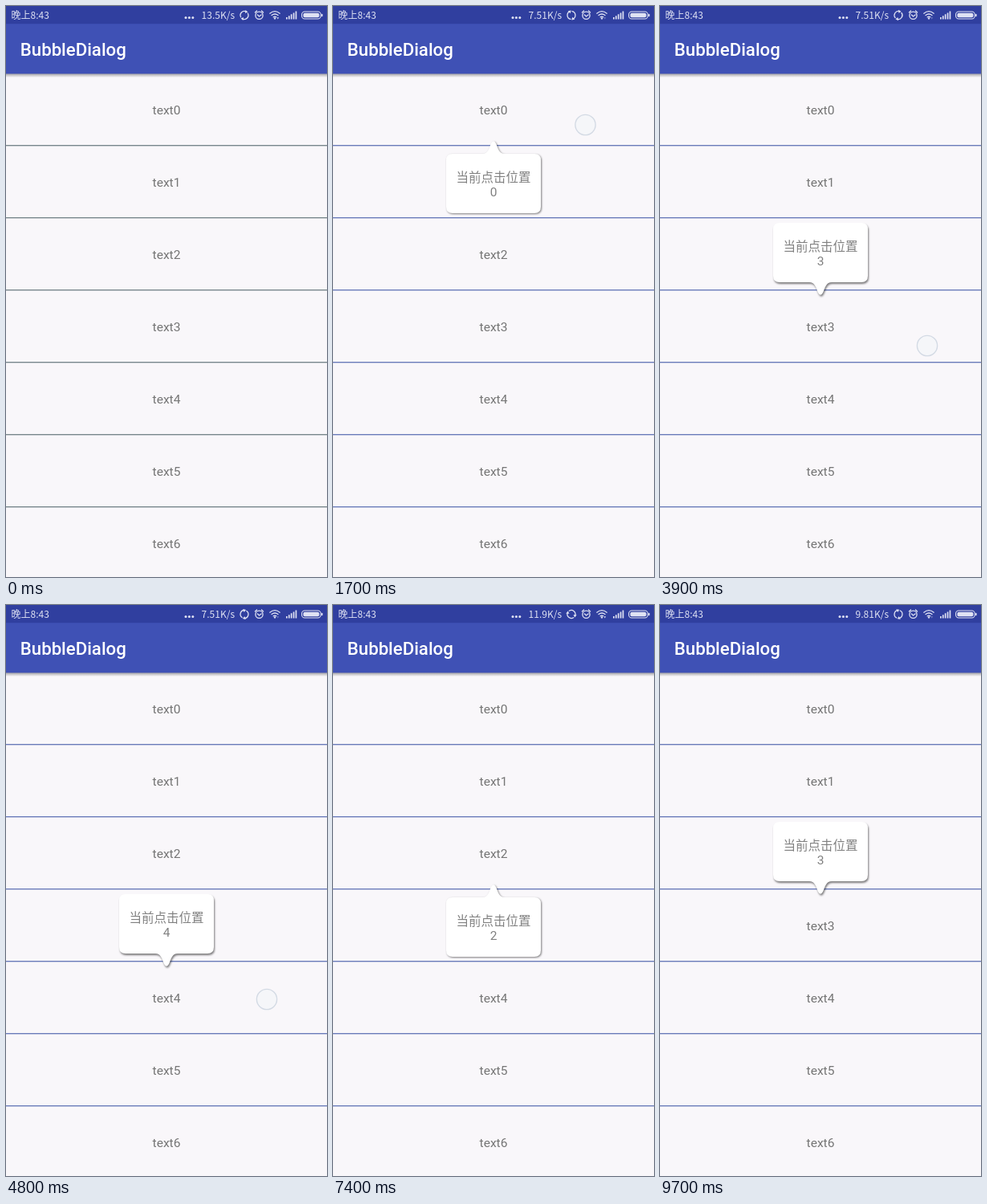
Write an HTML page that moves like this. It is 400 by 711 pixels and loops after 9.9 s.

```html
<!DOCTYPE html>
<html lang="zh">
<head>
<meta charset="utf-8">
<title>BubbleDialog</title>
<style>
  html, body { margin: 0; width: 100%; height: 100%; overflow: hidden; background: #f9f7fa; }
  svg { display: block; width: 100%; height: 100%; }
  text { font-family: Roboto, "Noto Sans CJK SC", "Noto Sans CJK", sans-serif; }
  .status { font: 12px "Noto Sans CJK SC", "Noto Sans CJK", "Noto Sans", sans-serif; fill: #dfe2f3; }
  .title { font-size: 22.2px; font-weight: 500; fill: #fff; }
  .row { font-size: 15.55px; fill: #757575; text-anchor: middle; }
  .bubble text { font-size: 15.5px; fill: #808080; text-anchor: middle; }
  .bubble path { fill: #fff; filter: drop-shadow(1.3px 1.3px 1.2px rgba(0, 0, 0, .5)); }
  .touch { fill: #f4f5f9; fill-opacity: .8; stroke: #d3dae4; stroke-width: 1.4; }
  .icon { fill: none; stroke: #dfe2f3; stroke-width: 1.3; stroke-linecap: round; }
  .solid { fill: #dfe2f3; }
</style>
</head>
<body>
<svg viewBox="0 0 400 711" preserveAspectRatio="none">
  <defs>
    <linearGradient id="shade" x1="0" y1="0" x2="0" y2="1">
      <stop offset="0" stop-color="#000" stop-opacity=".36"/>
      <stop offset="1" stop-color="#000" stop-opacity="0"/>
    </linearGradient>
  </defs>
  <rect width="400" height="711" fill="#f9f7fa"/>
  <g id="list"></g>
  <rect y="84" width="400" height="5" fill="url(#shade)"/>
  <rect width="400" height="84.4" fill="#3f51b5"/>
  <rect width="400" height="22.2" fill="#303f9f"/>
  <text class="title" x="17.8" y="62">BubbleDialog</text>

  <text class="status" x="6.5" y="16">晚上8:43</text>
  <g class="solid">
    <circle cx="224" cy="14.6" r="1.5"/>
    <circle cx="228.4" cy="14.6" r="1.5"/>
    <circle cx="232.8" cy="14.6" r="1.5"/>
  </g>
  <text class="status" id="speed" x="285" y="16" text-anchor="end"></text>
  <g id="sync">
    <path class="icon" d="M292.6 13.8A5 5 0 0 1 299.2 7M301.4 9.2A5 5 0 0 1 294.8 16"/>
    <path class="solid" d="M298.4 4.9l3 2.6l-3.4 1.6zM295.6 18.1l-3 -2.6l3.4 -1.6z"/>
  </g>
  <g class="icon">
    <circle cx="315.5" cy="11.8" r="4.6"/>
    <path d="M313.4 11l2.1 2l2.6 -2M310.4 8l2.2 -2M320.6 8l-2.2 -2"/>
    <path d="M328.8 9.2Q335 4.2 341.2 9.2M331 11.6Q335 8.4 339 11.6M333.2 13.8Q335 12.4 336.8 13.8"/>
  </g>
  <circle class="solid" cx="335" cy="15.4" r="1.2"/>
  <path class="solid" id="traffic" d="M337.6 14.2h2.4l-1.2 2.4z"/>
  <path class="solid" d="M349 14h1.7v2.4h-1.7zM351.9 12.3h1.7v4.1h-1.7zM354.8 10.3h1.7v6.1h-1.7zM357.7 8.4h1.7v8h-1.7zM360.6 6.6h1.7v9.8h-1.7z"/>
  <rect class="icon" x="368.6" y="7" width="23.6" height="9" rx="3.6" style="stroke-width:1.1"/>
  <rect class="solid" x="370.4" y="8.8" width="20" height="5.4" rx="2"/>
  <rect class="solid" x="393" y="9.8" width="1.6" height="3.4" rx=".8"/>

  <g id="bubbles"></g>
  <g id="touches"></g>
</svg>
<script>
const LOOP = 9900, STEP = 100, ROW = 90;
const $ = id => document.getElementById(id);

// row tapped, time the bubble opens, finger x, finger y
const taps = [
  [0, 1520, 314.5, 148],
  [1, 2720, 350, 222],
  [2, 3250, 345, 318],
  [3, 3800, 333, 423],
  [4, 4700, 325, 491],
  [5, 5600, 327, 604],
  [3, 6150, 325, 408],
  [2, 6800, 330, 312],
  [3, 7900, 325, 402]
];
const speeds = [[0, "13.5K/s"], [1000, "7.51K/s"], [5000, "11.9K/s"], [9000, "9.81K/s"]];
const early = [88, 108, 112], late = [70, 92, 170];

function outline(down) {
  const arrow = "C7 0 8 -6 11 -13Q14 -18.5 17 -13C20 -6 21 0 28 0";
  const body = `M149 0H186c${arrow.slice(1)}`;
  const d = body.replace("Q", "q").replace(/c7.*/, "") +
    "C193 0 194 -6 197 -13Q200 -18.5 203 -13C206 -6 207 0 214 0" +
    "H251Q259 0 259 8V66Q259 74 251 74H149Q141 74 141 66V8Q141 0 149 0Z";
  return "M149 0H186" + d.slice(d.indexOf("C193")) + (down ? "" : "");
}

function bubble(row) {
  const down = row > 2;
  const top = down ? ROW * row : 184 + ROW * row;
  const flip = down ? ' transform="matrix(1 0 0 -1 0 74)"' : "";
  const shadow = down ? ' style="filter:drop-shadow(1.3px -1.3px 1.2px rgba(0,0,0,.5))"' : "";
  return `<g class="bubble" transform="translate(0 ${top})" opacity="0">
    <path d="${outline(down)}"${flip}${shadow}/>
    <text x="200" y="35">当前点击位置</text><text x="200" y="53">${row}</text></g>`;
}

let rows = "";
for (let i = 0; i < 7; i++) {
  rows += `<text class="row" x="200" y="${135 + ROW * i}">text${i}</text>
    <rect y="${173.2 + ROW * i}" width="400" height="1.1"/>`;
}
$("list").innerHTML = rows;
$("bubbles").innerHTML = taps.map(t => bubble(t[0])).join("");
$("touches").innerHTML = taps.map(t =>
  `<circle class="touch" cx="${t[2]}" cy="${t[3]}" r="12.6" opacity="0"/>`).join("");

const bubbles = [...$("bubbles").children];
const touches = [...$("touches").children];
const clamp = v => Math.max(0, Math.min(1, v));

function draw(t) {
  taps.forEach(([, open], i) => {
    const close = i + 1 < taps.length ? taps[i + 1][1] : LOOP + 100;
    bubbles[i].setAttribute("opacity", Math.min(clamp((t - open) / 90), clamp((close + 60 - t) / 60)));
    const on = t >= open - 130 && t < open + 190;
    touches[i].setAttribute("opacity", on ? 1 : 0);
  });
  $("speed").textContent = speeds.filter(s => s[0] <= t).pop()[1];
  const k = clamp((t - 200) / 1200);
  $("list").style.fill = `rgb(${early.map((c, i) => Math.round(c + (late[i] - c) * k))})`;
  const n = Math.floor(t / STEP);
  $("sync").setAttribute("transform", `rotate(${n * 1800 / 99} 297 11.5)`);
  $("traffic").setAttribute("opacity", Math.floor(n / 5) % 2 ? .4 : 1);
}

let start;
function tick(now) {
  if (start === undefined) start = now;
  draw((now - start) % LOOP);
  requestAnimationFrame(tick);
}
draw(0);
requestAnimationFrame(tick);
</script>
</body>
</html>
```
